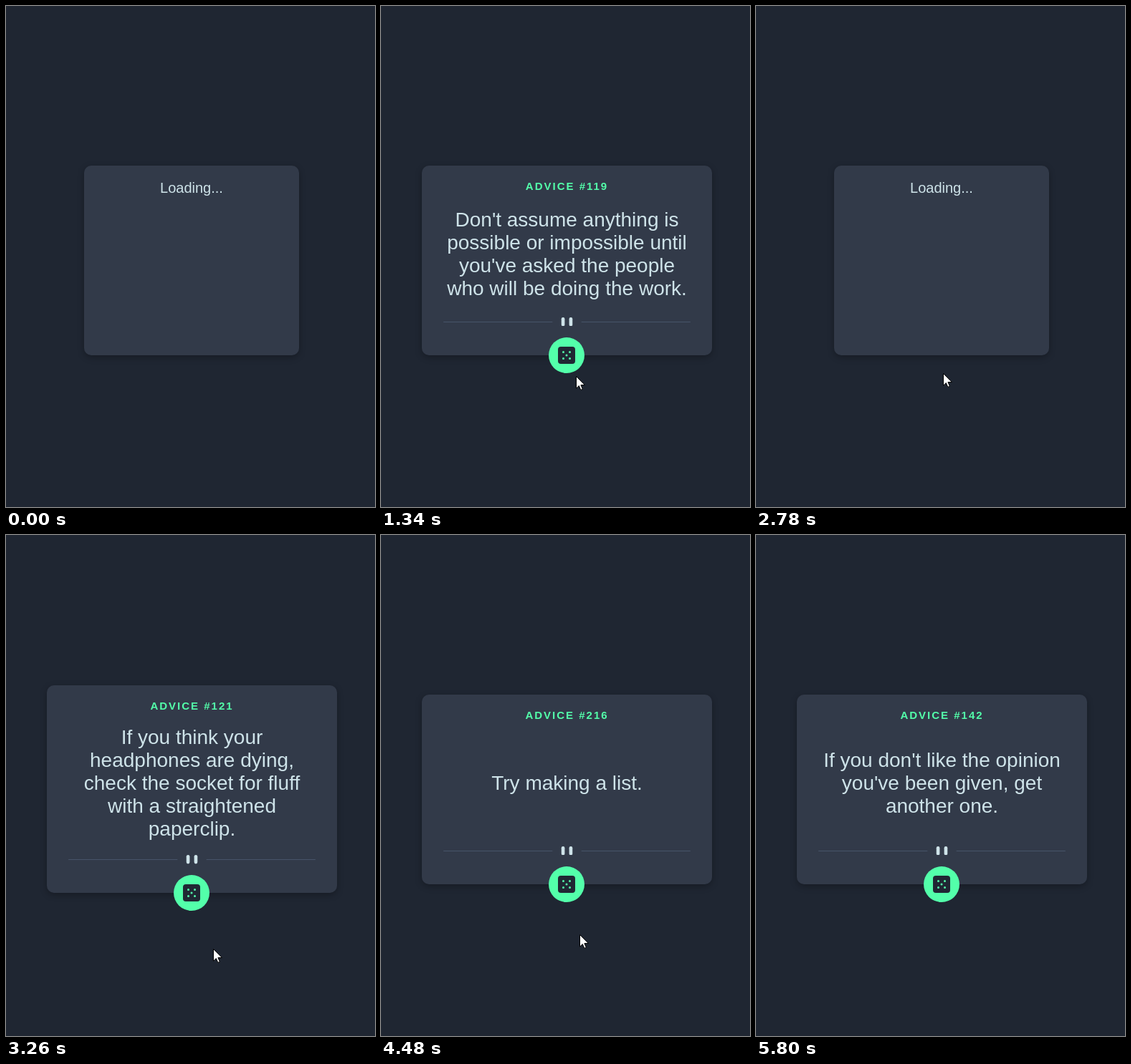
An HTML page for the animation above (6.33 s loop, 515x700 px).

```html
<!DOCTYPE html>
<html lang="en">
<head>
<meta charset="utf-8">
<title>Advice card</title>
<style>
  html, body { margin: 0; width: 100%; height: 100%; overflow: hidden; background: #1f2632; }
  body { position: relative; font-family: "Liberation Sans", Arial, sans-serif; }
  #card, #card > *, #cursor { position: absolute; }
  #card {
    border-radius: 10px;
    background: #323a49;
    box-shadow: 0 3px 10px rgba(0, 0, 0, .28);
    color: #cee3e9;
    text-align: center;
    white-space: nowrap;
  }
  #title { left: 0; right: 0; top: 20px; }
  .loading #title { font-size: 20px; line-height: 23px; }
  .advice #title { font-size: 15px; line-height: 17px; font-weight: bold; letter-spacing: 2px; color: #53ffaa; }
  .loading #quote, .loading #rule, .loading #dice { display: none; }
  #quote { left: 0; right: 0; font-size: 28px; line-height: 32px; white-space: pre; }
  #rule { left: 30px; width: 345px; height: 12.43px; }
  #dice { left: 177px; bottom: -25px; width: 50px; height: 50px; border-radius: 50%; background: #53ffaa; }
  #dice svg { position: absolute; left: 13px; top: 13px; }
  #cursor { left: 0; top: 0; overflow: visible; }
</style>
</head>
<body>
<div id="card">
  <div id="title"></div>
  <div id="quote"></div>
  <svg id="rule" viewBox="0 0 444 16">
    <path fill="#4f5d74" d="M0 8h196v1H0zM248 8h196v1H248z"/>
    <g fill="#cee3e9"><rect x="212" width="6" height="16" rx="3"/><rect x="226" width="6" height="16" rx="3"/></g>
  </svg>
  <div id="dice">
    <svg width="24" height="24">
      <rect width="24" height="24" rx="4" fill="#202733"/>
      <g fill="#53ffaa">
        <circle cx="7.5" cy="7.5" r="1.5"/><circle cx="16.5" cy="7.5" r="1.5"/><circle cx="12" cy="12" r="1.5"/>
        <circle cx="7.5" cy="16.5" r="1.5"/><circle cx="16.5" cy="16.5" r="1.5"/>
      </g>
    </svg>
  </div>
</div>
<svg id="cursor" width="1" height="1">
  <circle id="press" r="12" fill="#ff0" fill-opacity=".5"/>
  <g fill="#fff" stroke="#000" stroke-linejoin="round">
    <path id="arrow" d="M-.5-.5V16.2L3.3 12.6 5.8 18.4 8.4 17.3 5.9 11.6H11.4Z"/>
    <path id="hand" d="M-1.5 2a2 2 0 0 1 4 0V7q2-1 3.5.6 2-.7 3 .9 2.4-.2 2.4 2v5l-2 4.5v3H.5v-2l-3.5-4.500-3-4.500q.3-2 2.500-1.300l2 2z"/>
  </g>
</svg>
<script>
const LOOP = 6330, TICK = 70;
const $ = id => document.getElementById(id);
const [card, title, quote, rule, dice, cursor, press, arrow, hand] =
  ['card', 'title', 'quote', 'rule', 'dice', 'cursor', 'press', 'arrow', 'hand'].map($);

const advice = (id, ...lines) => ({ id, lines });
const fluff = advice(121, 'If you think your', 'headphones are dying,',
  'check the socket for fluff', 'with a straightened', 'paperclip.');

// [start time, advice or null while loading]
const scenes = [
  [0, null],
  [400, advice(119, "Don't assume anything is", 'possible or impossible until',
    "you've asked the people", 'who will be doing the work.')],
  [1780, null],
  [2240, fluff],
  [2780, null],
  [3060, fluff],
  [3940, null],
  [4210, advice(216, 'Try making a list.')],
  [5110, null],
  [5450, advice(142, "If you don't like the opinion", "you've been given, get", 'another one.')]
];

const easeOut = u => 1 - (1 - u) ** 2;
const easeIn = u => u ** 1.5;
const smooth = u => u * u * (3 - 2 * u);
const linear = u => u;

// [from, to, x, y, easing]
const entry = [400, 566], visible = [[1060, 5800]];
const moves = [
  [1060, 1340, 273, 518, easeOut],
  [1360, 1640, 262, 510, linear],
  [1890, 2170, 262, 514, linear],
  [2780, 2860, 264, 517, linear],
  [3060, 3260, 290, 579, easeOut],
  [3460, 3740, 269, 519, smooth],
  [4210, 4420, 278, 559, smooth],
  [4490, 4770, 264, 513, smooth],
  [5110, 5520, 434, 654, easeIn],
  [5520, 5800, 483.5, 711, linear]
];
const hovers = [[1570, 1780], [2640, 2780], [3740, 3940], [4770, 5110]];
const glows = hovers.filter(h => h[0] !== 2640);
const presses = [[1710, 1780], [2710, 2780], [3870, 3940], [5040, 5110]];

const within = (spans, t) => spans.find(([a, b]) => t >= a && t < b);
const show = (el, on) => { el.style.display = on ? '' : 'none'; };

// The pointer advances in even ticks inside each move.
function pointer(t) {
  let [x, y] = entry;
  for (const [from, to, tx, ty, ease] of moves) {
    if (t < from) break;
    const n = Math.round((to - from) / TICK);
    const u = ease(Math.min(1, Math.floor((t - from) / (to - from) * n + 1e-6) / n));
    x += (tx - x) * u;
    y += (ty - y) * u;
  }
  return [Math.round(x), Math.round(y)];
}

function place(left, top, width, height) {
  Object.assign(card.style, { left: left + 'px', top: top + 'px', width: width + 'px', height: height + 'px' });
}

let shown;
function setScene(item) {
  if (item === shown) return;
  shown = item;
  card.className = item ? 'advice' : 'loading';
  if (!item) {
    place(109, 223, 300, 265);
    title.textContent = 'Loading...';
    return;
  }
  const tall = item.lines.length > 4, top = tall ? 210 : 223;
  place(57, top, 405, tall ? 290 : 265);
  title.textContent = 'ADVICE #' + item.id;
  quote.textContent = item.lines.join('\n');
  quote.style.top = 347 - 16 * item.lines.length - top + 'px';
  rule.style.top = (tall ? 447.1 : 434.78) - top + 'px';
}

function draw(t) {
  setScene(scenes.filter(s => s[0] <= t).pop()[1]);

  const glow = within(glows, t);
  const power = glow ? Math.min(1, (Math.floor((t - glow[0]) / TICK) + 1) / 4) : 0;
  dice.style.boxShadow = power ? `0 0 ${40 * power}px rgba(83, 255, 170, ${power})` : 'none';

  const [x, y] = pointer(t), over = !!within(hovers, t);
  show(cursor, within(visible, t));
  cursor.style.transform = `translate(${x}px, ${y}px)`;
  show(hand, over);
  show(arrow, !over);
  show(press, within(presses, t));
}

const start = performance.now();
function frame() {
  draw((performance.now() - start) % LOOP);
  requestAnimationFrame(frame);
}
frame();
</script>
</body>
</html>
```
